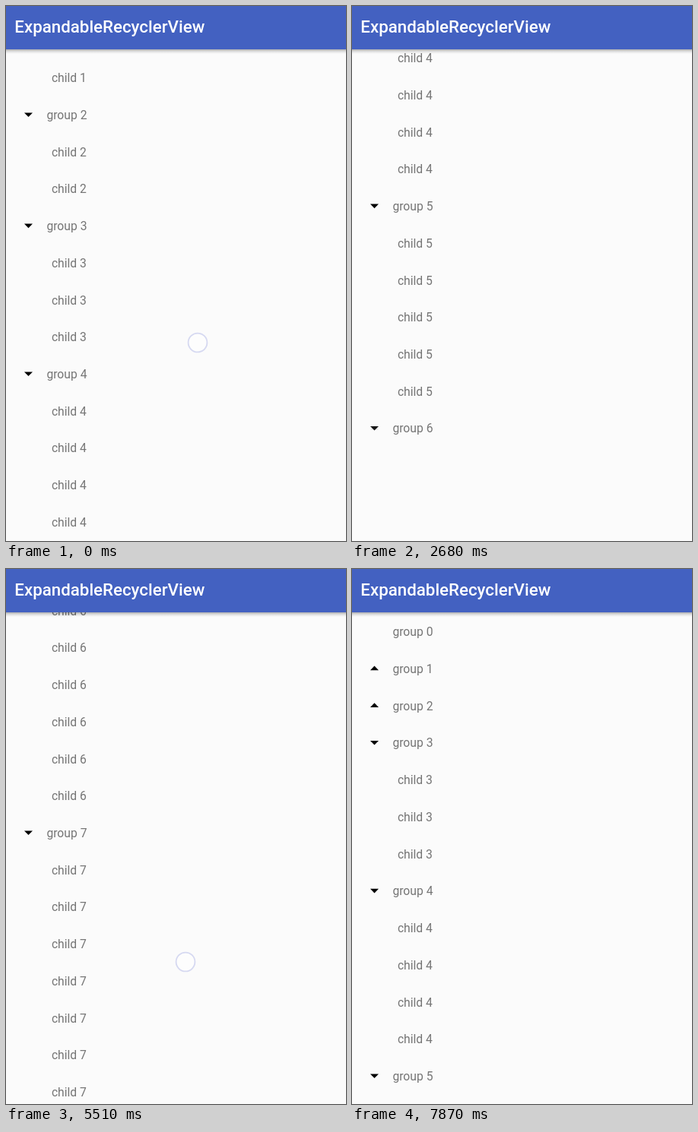
An HTML page that plays this animation: 447 px wide and 704 px high, repeating every 8 s.

```html
<!DOCTYPE html>
<html lang="en">
<head>
<meta charset="utf-8">
<title>ExpandableRecyclerView</title>
<style>
  html, body { margin: 0; width: 100%; height: 100%; overflow: hidden; background: #fbfbfb; }
  svg { display: block; width: 447px; height: 704px; font-family: Roboto, sans-serif; }
  .row text { font-size: 15.7px; fill: #757575; }
</style>
</head>
<body>
<svg viewBox="0 0 447 704">
  <defs>
    <linearGradient id="shade" x2="0" y2="1">
      <stop offset="0" stop-color="#000" stop-opacity=".3"/>
      <stop offset=".5" stop-color="#000" stop-opacity=".1"/>
      <stop offset="1" stop-color="#000" stop-opacity="0"/>
    </linearGradient>
  </defs>
  <rect width="447" height="704" fill="#fbfbfb"/>
  <g id="list"></g>
  <path id="glow" fill="#4361c1" fill-opacity=".36"/>
  <rect y="57" width="447" height="6" fill="url(#shade)"/>
  <rect width="447" height="57" fill="#4361c1"/>
  <text x="11.3" y="35.3" font-size="22.3" font-weight="500" fill="#fff">ExpandableRecyclerView</text>
  <circle id="touch" r="12.4" fill="#fff" fill-opacity=".45" stroke="#d6d9f1" stroke-width="1.8"/>
</svg>
<script>
const LOOP = 8000, BEAT = 148.45; // the screen refreshes once per beat
const ROW = 48.72, FIRST = 83;
const MOVE = 1.68, FADE = 0.81; // list animation lengths, in beats

// beat: scroll offset
const scroll = {
  0: 85.5, 1: 118, 3: 262, 4: 293, 6: 293, 11: 512.8, 12: 550, 19: 550, 21: 842.3,
  28: 842.3, 30: 1183.3, 35: 1183.3, 37: 1099.5, 38: 950, 40: 0
};
const drag = (start, end, x, y, toX, toY) => ({ start, end, x, y, toX, toY });
const tap = (start, x, y) => drag(start, start + 1, x, y, x, y);
const touches = [
  drag(0, 3, 252, 443, 353, 235),
  drag(6, 12, 211, 572, 241, 308),
  tap(15, 89, 556),
  drag(19, 21, 236, 519, 330, 227),
  tap(25, 89, 605),
  drag(28, 30, 236, 627, 336, 286),
  drag(35, 39, 222, 451, 250, 583),
  tap(45, 89, 130.5),
  tap(48, 97, 180)
];
// beats at which the list hits an end
const bottomHits = [12.7, 21, 30], topHit = 40;
// beat at which each group starts to open or close
const opens = { 6: 16.66, 7: 26.3 };
const closes = { 1: 46.3, 2: 49.85 };

const clamp = v => Math.max(0, Math.min(1, v));
const lerp = (a, b, mix) => a + (b - a) * mix;
const ease = v => (1 - Math.cos(Math.PI * clamp(v))) / 2;
const byId = id => document.getElementById(id);

function scrollAt(beat) {
  const beats = Object.keys(scroll).map(Number);
  const next = beats.find(b => b > beat);
  if (next === undefined) return scroll[beats.at(-1)];
  const last = beats[beats.indexOf(next) - 1];
  return lerp(scroll[last], scroll[next], (beat - last) / (next - last));
}

function make(tag, attrs, parent) {
  const node = document.createElementNS('http://www.w3.org/2000/svg', tag);
  setAll(node, attrs);
  return parent.appendChild(node);
}

function setAll(node, attrs) {
  for (const name in attrs) node.setAttribute(name, attrs[name]);
}

function makeRow(label, x) {
  const node = make('g', { class: 'row' }, byId('list'));
  make('text', { x, y: 5.3 }, node).textContent = label;
  return node;
}

const groups = Array.from({ length: 10 }, (_, n) => {
  const head = makeRow('group ' + n, 53.4);
  const group = { n, head, children: [] };
  if (n) {
    group.down = make('path', { d: 'M24-3.2h11l-5.5 5.6z' }, head);
    group.up = make('path', { d: 'M24 1.5h11l-5.5-5.6z' }, head);
  }
  if (n < 8) for (let i = 0; i < n; i++) group.children.push(makeRow('child ' + n, 59.9));
  return group;
});

// How far a group's space is open, and how visible its children are
function expansion(n, beat) {
  if (n in opens) {
    const since = beat - opens[n];
    return { space: ease(since / MOVE), alpha: clamp((since - MOVE) / FADE) };
  }
  if (n in closes) {
    const since = beat - closes[n];
    return { space: 1 - ease((since - FADE) / MOVE), alpha: 1 - clamp(since / FADE) };
  }
  const open = n < 6 ? 1 : 0;
  return { space: open, alpha: open };
}

function place(node, y, opacity) {
  setAll(node, { transform: `translate(0 ${y.toFixed(2)})`, opacity });
}

function drawList(beat) {
  let y = FIRST - scrollAt(beat);
  for (const { n, head, up, down, children } of groups) {
    const { space, alpha } = expansion(n, beat);
    place(head, y, 1);
    if (n) {
      setAll(down, { opacity: space });
      setAll(up, { opacity: 1 - space });
    }
    children.forEach((child, i) => place(child, y + ROW * (i + 1), alpha));
    y += ROW * (1 + n * space);
  }
}

// Rises within one beat, then shrinks over two
const pulse = since => clamp(since < 0 ? 1 + since : 1 - since / 2);

function drawGlow(beat) {
  const top = pulse(beat - topHit);
  const size = top || Math.max(...bottomHits.map(hit => pulse(beat - hit)));
  const base = top ? 57 : 727, dir = top ? 1 : -1;
  const side = base + dir * 30 * size, peak = base + dir * 76 * size;
  setAll(byId('glow'), {
    d: `M5 ${base}V${side}Q230 ${peak} 447 ${side}V${base}z`,
    opacity: clamp(size * 1.3)
  });
}

function drawTouch(beat) {
  const touch = touches.findLast(t => beat >= t.start);
  const { start, end, x, y, toX, toY } = touch;
  const mix = clamp((beat - start) / (end - start));
  setAll(byId('touch'), {
    cx: lerp(x, toX, mix),
    cy: lerp(y, toY, mix),
    opacity: clamp((end + 2 - beat) / 2.5)
  });
}

function draw(ms) {
  const beat = Math.floor((ms % LOOP) / BEAT);
  drawList(beat);
  drawGlow(beat);
  drawTouch(beat);
}

let origin;
function tick(now) {
  origin ??= now;
  draw(now - origin);
  requestAnimationFrame(tick);
}
draw(0);
requestAnimationFrame(tick);
</script>
</body>
</html>
```
